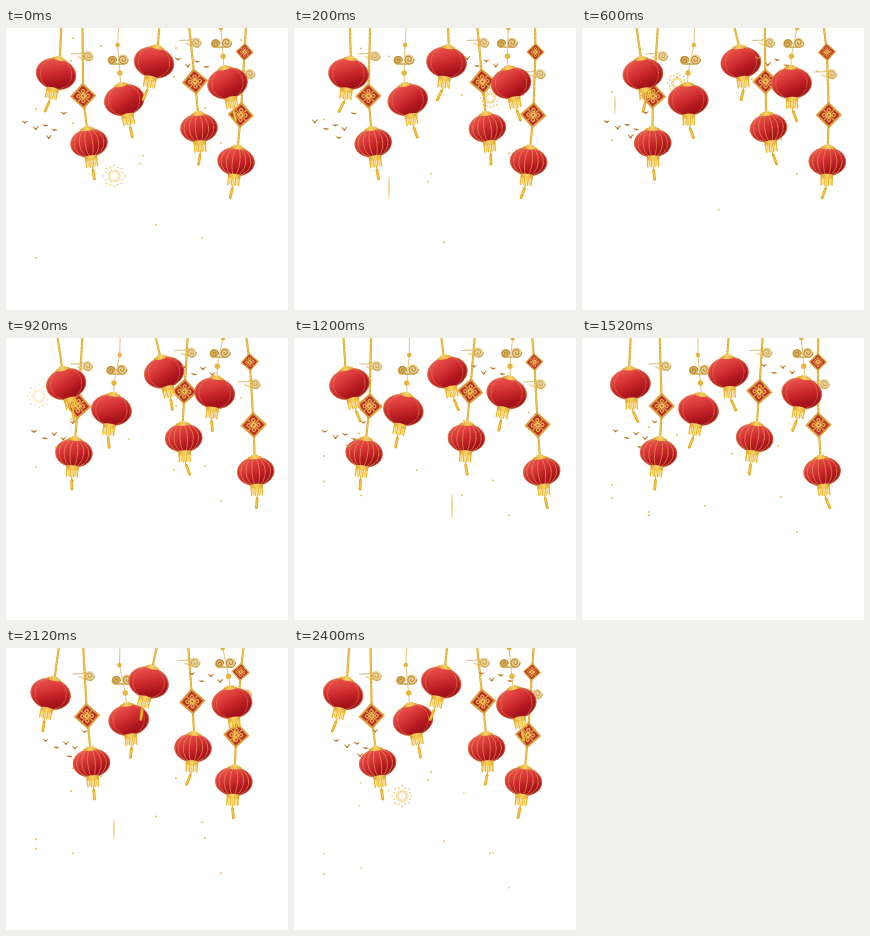
An HTML page with a canvas for the animation above (2440 ms loop, 282x282 px).

```html
<!DOCTYPE html>
<html>
<head>
<meta charset="utf-8">
<style>
html, body { margin: 0; width: 100%; height: 100%; overflow: hidden; background: #fff; }
canvas { display: block; width: 282px; height: 282px; }
</style>
</head>
<body>
<canvas id="stage"></canvas>
<script>
const LOOP = 2440, STEP = 40, TAU = Math.PI * 2, RAD = Math.PI / 180;
const canvas = document.getElementById('stage');
const ctx = canvas.getContext('2d');
const dpr = window.devicePixelRatio || 1;
canvas.width = canvas.height = 282 * dpr;
let t = 0;

// One swing: mean, amplitude, time of the peak
const wave = ([mean, amp, peak]) => mean + amp * Math.cos(TAU * (t - peak) / LOOP);

function at(x, y, angle, draw) {
  ctx.save();
  ctx.translate(x, y);
  ctx.rotate(angle);
  draw();
  ctx.restore();
}

function dot(x, y, r, color) {
  ctx.fillStyle = color;
  ctx.beginPath();
  ctx.arc(x, y, r, 0, TAU);
  ctx.fill();
}

function line(points, color, width) {
  ctx.strokeStyle = color;
  ctx.lineWidth = width;
  ctx.beginPath();
  points.forEach(([x, y], i) => i ? ctx.lineTo(x, y) : ctx.moveTo(x, y));
  ctx.stroke();
}

function gradient(x0, y0, x1, y1, ...colors) {
  const g = ctx.createLinearGradient(x0, y0, x1, y1);
  colors.forEach((c, i) => g.addColorStop(i / (colors.length - 1), c));
  return g;
}

function rope(points, thin) {
  if (thin) return line(points, '#e3c27a', 1);
  line(points, '#dba32a', 2.1);
  ctx.setLineDash([1.6, 2]);
  line(points, '#f3c953', 1.3);
  ctx.setLineDash([]);
}

function ribs(rx, ry, radii, color, width) {
  ctx.strokeStyle = color;
  ctx.lineWidth = width;
  for (const k of radii) {
    ctx.beginPath();
    ctx.ellipse(0, 0, rx * k, ry, 0, 0, TAU);
    ctx.stroke();
  }
}

function lantern(x, y, tilt, tail, striped) {
  const rx = striped ? 18.7 : 20.3, ry = striped ? 14.3 : 15.6;
  const end = ry + 11;
  const ex = x - Math.sin(tilt) * end, ey = y + Math.cos(tilt) * end;
  line([[ex, ey - 2], [ex + tail * 0.3, ey + 3]], '#e9b63c', 1.2);
  line([[ex + tail * 0.25, ey + 2], [ex + tail, ey + 11]], '#e5a823', 2.8);
  line([[ex + tail * 0.3, ey + 3], [ex + tail, ey + 10]], '#f5cc50', 1.1);
  at(x, y, tilt, () => {
    const gold = gradient(-7, 0, 7, 0, '#dc9c20', '#f8d266', '#dfa028');
    ctx.fillStyle = gold;
    ctx.fillRect(-6.2, ry - 1, 12.4, 4);
    for (let i = -3; i <= 3; i++) {
      ctx.fillStyle = i % 2 ? '#edb838' : '#f6cf5c';
      ctx.fillRect(i * 1.8 - 0.8, ry + 2, 1.4, 7 + (i % 2 ? 1 : 0));
    }
    ctx.fillStyle = gradient(-6, -ry, 7, ry, '#e9534d', '#dd3f3d', '#c9282c', '#ad161d', '#980f18');
    ctx.beginPath();
    ctx.ellipse(0, 0, rx, ry, 0, 0, TAU);
    ctx.fill();
    if (striped) ribs(rx, ry, [0.2, 0.52, 0.8], 'rgba(232,150,85,.8)', 0.8);
    else ribs(rx, ry, [0.78], 'rgba(232,140,85,.6)', 0.7);
    ribs(rx, ry, [0.98], 'rgba(222,140,75,.8)', 0.7);
    ctx.fillStyle = gold;
    ctx.beginPath();
    ctx.ellipse(0, -ry + 0.3, 7, 1.8, 0, 0, TAU);
    ctx.fill();
    ctx.fillRect(-3.5, -ry - 2.4, 7, 2.4);
    ctx.beginPath();
    ctx.ellipse(0, ry - 0.4, 6.5, 1.6, 0, 0, TAU);
    ctx.fill();
  });
}

function knot(x, y, angle, size) {
  at(x, y, angle + Math.PI / 4, () => {
    const s = size * 0.72;
    const square = (k, color) => {
      ctx.fillStyle = color;
      ctx.fillRect(-s * k, -s * k, s * k * 2, s * k * 2);
    };
    square(1, '#dba03c');
    square(0.8, '#bb2f2b');
    for (let i = 0; i < 4; i++) {
      ctx.rotate(Math.PI / 2);
      line([[0, 0], [s * 0.8, 0]], '#dfa444', size * 0.1);
      dot(s * 0.36, s * 0.36, s * 0.24, '#e3aa48');
      dot(s * 0.36, s * 0.36, s * 0.1, '#bb2f2b');
    }
    square(0.26, '#efc058');
    square(0.1, '#c2562f');
  });
}

function curl(x, y, r, turn, fill, ink) {
  dot(x, y, r, fill);
  ctx.strokeStyle = ink;
  ctx.lineWidth = 1.1;
  ctx.beginPath();
  for (let i = 0; i <= 20; i++) {
    const a = i * 0.5 * turn, k = r * (1 - i / 24);
    ctx.lineTo(x + Math.cos(a) * k, y + Math.sin(a) * k);
  }
  ctx.stroke();
}

function cloud(x, y) {
  line([[x - 17, y - 2], [x - 8, y - 2.4], [x, y - 4]], '#dcc183', 1.1);
  line([[x - 10, y + 1], [x - 4, y + 3.2], [x + 2, y + 4.5]], '#ead6a6', 1.8);
  curl(x, y, 5, 1, '#ecd7a2', '#cfa755');
}

function cloudPair(x, y) {
  line([[x - 9, y + 1], [x - 4, y + 4], [x + 6, y + 4]], '#d8b468', 1.8);
  curl(x - 6, y + 0.5, 4.5, -1, '#dcb767', '#b98632');
  curl(x + 5, y - 0.5, 5.2, 1, '#ecd096', '#bd8c38');
}

// Plain lantern on a thick rope
function plainString(dx, dy) {
  const x = dx + wave([52.5, 8.8, 720]), y = dy + 46;
  const tilt = wave([0, 14, -200]) * RAD;
  const cx = x + Math.sin(tilt) * 18;
  rope([[dx + wave([52.3, 3.7, 250]), 0], [cx, y - 17]]);
  lantern(x, y, tilt, -wave([0, 6, 180]), false);
}

// Plain lantern on a thin beaded rope with two curls
function beadString(dx, dy) {
  const x = dx + wave([114, 9, 2020]), y = dy + 72;
  const tilt = -wave([0, 12, 50]) * RAD;
  const b1 = dx + wave([113.5, 2.5, 1500]), b2 = dx + wave([113.5, 7.5, 1850]);
  const cx = x + Math.sin(tilt) * 18;
  rope([[dx + wave([114, 2, 1500]), Math.min(0, dy)], [b1, dy + 17], [b2, dy + 45], [cx, y - 17]], true);
  cloudPair(dx + wave([113.3, 5, 1740]), dy + 32);
  dot(b1, dy + 17, 2.2, '#e6b03a');
  dot(b2, dy + 45, 2.7, '#e9b53e');
  lantern(x, y, tilt, wave([0, 5, 400]), false);
}

// Striped lantern hanging below one or two knots
function knotString(o) {
  const x = wave(o.body), tilt = -wave(o.tilt) * RAD;
  const pts = [[wave(o.top), 0]];
  for (const k of o.knots) pts.push([wave(k.x), k.y]);
  pts.push([x + Math.sin(tilt) * 16, o.y - 16]);
  cloud(wave(o.cloud), o.cloudY);
  rope(pts);
  o.knots.forEach((k, i) => {
    const [x0, y0] = pts[i], [x1, y1] = pts[i + 2];
    knot(pts[i + 1][0], k.y, Math.atan2(x0 - x1, y1 - y0), k.size);
  });
  lantern(x, o.y, tilt, wave(o.tail), true);
}

const knotStrings = [
  { top: [76.8, 1, 1700], knots: [{ x: [76.5, 5.5, 1880], y: 68, size: 13 }],
    body: [76.7, 8.8, 2140], y: 115, tilt: [0, 8, 50], tail: [0.6, 1.5, 200],
    cloud: [82.5, 1.7, 1750], cloudY: 28 },
  { top: [182, 1.5, 200], knots: [{ x: [182.5, 6.5, 50], y: 53.5, size: 13 }],
    body: [182.6, 11, 130], y: 100, tilt: [0, 9, 450], tail: [0, 5, 780],
    cloud: [187.3, 3, 50], cloudY: 14.5 },
  { top: [239, 3, 500],
    knots: [{ x: [239.3, 5.7, 660], y: 24, size: 9 }, { x: [239, 9, 800], y: 87, size: 13 }],
    body: [238.7, 11, 960], y: 133.5, tilt: [0, 7, 1300], tail: [0, 5.2, 1600],
    cloud: [245, 5, 700], cloudY: 46 }
];

function bird(x, y, i) {
  const flap = 1.6 * Math.sin(TAU * t / 610 + i * 1.9);
  line([[x - 2.4, y - 0.8 - flap * 0.6], [x - 0.3, y + 0.8], [x + 2.2, y - 0.6 - flap]], '#c98a3e', 1.1);
  dot(x, y + 0.5, 0.9, '#b0702a');
}

const flocks = [
  { vx: 9.7, vy: -0.8, birds: [[19, 94], [30, 100.5], [39.5, 97], [48.5, 101.5], [43, 109.5], [58, 85]] },
  { vx: 6.6, vy: -2.5, birds: [[172, 31], [182, 38], [191, 33], [200.5, 38.5]] }
];

// Falling specks: x, y at loop start, px per second, first and last time
const specks = [
  [30, 81, 52], [67, 95, 52], [199, 80, 52], [215, 115, 52], [95, 18, 52],
  [170, 20, 52], [65, 33, 52], [67, 10, 52], [235, 12, 52],
  [168, 49, 90, 0, 1280], [30, 10, 90, 560, 2540], [150, -18, 88, 1420, 2720],
  [134, -84, 90, 2280, 2760], [137, -92, 90, 2280, 3100],
  [196, -61, 111, 1300, 2520], [123, -1, 111, 760, 1960], [67, 7, 112, 900, 1960]
];

function drawSpecks() {
  for (const [x, y, v, from = 0, to = LOOP] of specks) {
    for (const s of [t, t + LOOP]) {
      if (s < from || s >= to) continue;
      ctx.globalAlpha = Math.min(1, (to - s) / 120 + 0.3);
      dot(x, y + v * s / 1000, 0.95, '#f0b84a');
    }
  }
  ctx.globalAlpha = 1;
}

// Fireworks: x, launch y, burst y, launch, arrival and burst times
const fireworks = [
  [95, 233, 55, 20, 460, 460],
  [33, 160, 58, 340, 660, 660],
  [158, 206, 106, 1080, 1400, 1720],
  [108, 250, 148, 1960, 2200, 2240],
  [196, 200, 70, 2240, 2480, 2500]
];

function drawFireworks() {
  for (const [x, y0, y1, start, stop, burst] of fireworks) {
    for (const s of [t, t + LOOP]) {
      if (s >= start && s < stop) {
        const p = (s - start) / (stop - start), y = y0 + (y1 - y0) * p;
        const half = 14 - 7 * p;
        line([[x, y - half], [x, y + half]],
          gradient(0, y - half, 0, y + half, '#f6d58a', '#f0bd58', '#f8e0a4'), 1.3);
      }
      const q = (s - burst) / 340;
      if (q < 0 || q >= 1) continue;
      const r = 2 + 9.5 * (1 - (1 - q) ** 3);
      ctx.globalAlpha = Math.min(1, (1 - q) * 2.2);
      for (let i = 0; i < 16; i++) {
        at(x, y1, i * TAU / 16, () => {
          line([[r * 0.4, 0], [r * 0.6, 0]], '#f3c45c', 1);
          dot(r * (i % 2 ? 0.85 : 0.98), 0, 0.8, '#f0bc54');
        });
      }
      ctx.globalAlpha = 1;
    }
  }
}

function draw(now) {
  t = Math.floor(now % LOOP / STEP) * STEP;
  ctx.setTransform(dpr, 0, 0, dpr, 0, 0);
  ctx.clearRect(0, 0, 282, 282);
  ctx.lineCap = ctx.lineJoin = 'round';
  drawFireworks();
  drawSpecks();
  knotStrings.forEach(knotString);
  beadString(0, 0);
  beadString(103.3, -16.8);
  plainString(0, 0);
  plainString(98, -11.5);
  for (const { vx, vy, birds } of flocks) {
    birds.forEach(([x, y], i) => bird(x + vx * t / 1000, y + vy * t / 1000, i));
  }
}

const begin = performance.now();
function tick() {
  draw(performance.now() - begin);
  requestAnimationFrame(tick);
}
tick();
</script>
</body>
</html>
```
